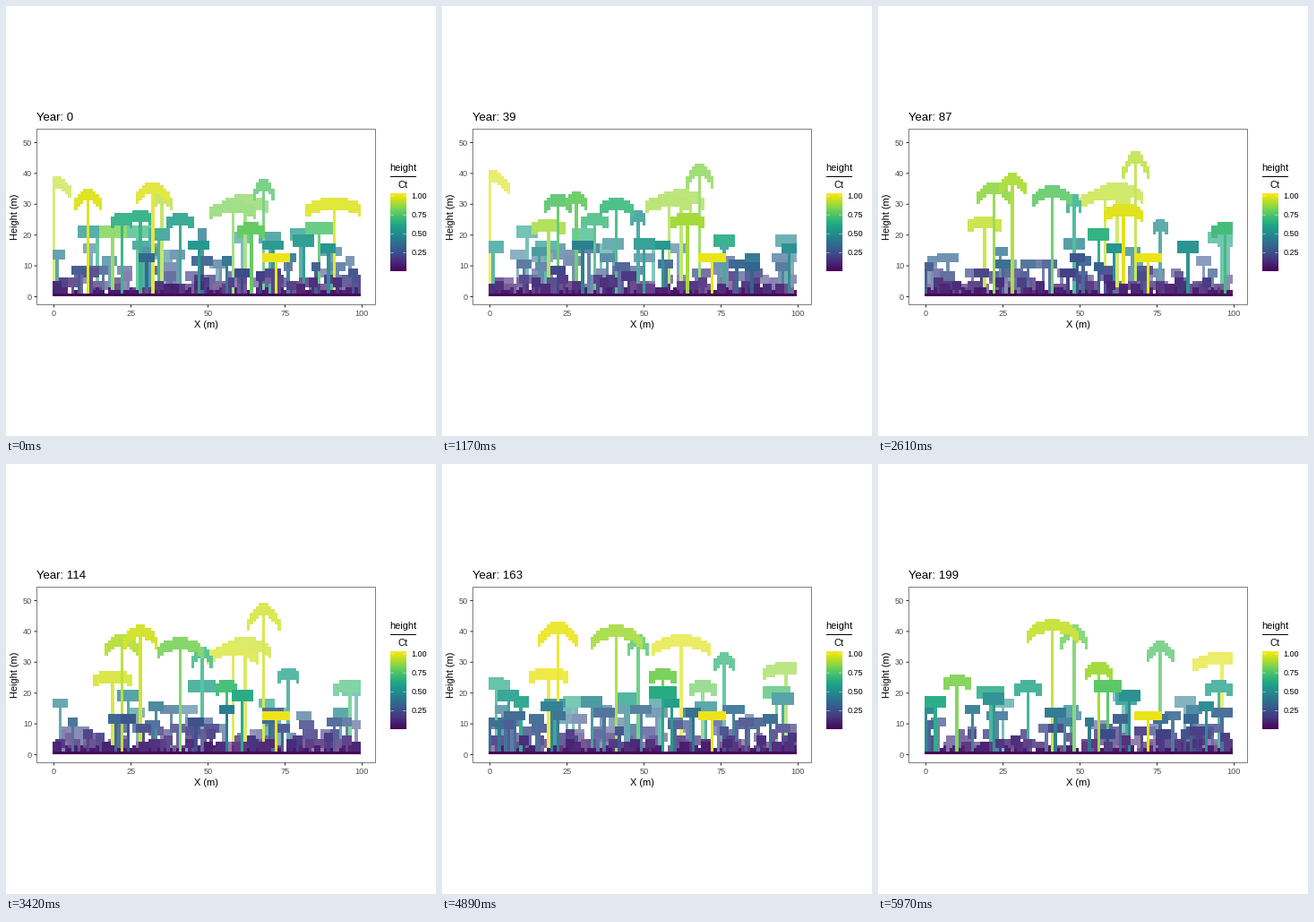
Write a matplotlib script that moves like this. It is 480 px wide and 480 px high and loops after 6 s.

```python
import numpy as np
import matplotlib.pyplot as plt
from matplotlib.animation import FuncAnimation

plt.rcParams["font.family"] = "Liberation Sans"

YEARS, COLS, ROWS = 200, 100, 52
X0, Y0, CELL = 53.5, 324.5, 3.44
PT = 0.75  # points per pixel at 96 dpi
VMAX = 1.03
viridis = plt.colormaps["viridis"]
rng = np.random.default_rng(12)

# Dominant trees, back to front: column, crown radius, first and last height,
# year of death
GIANTS = [
    (0, 6, 39, 42, 70), (96, 9, 6, 34, 205), (62, 9, 33, 40, 190),
    (58, 9, 31, 38, 160), (35, 4, 34, 38, 38), (76, 6, 11, 49, 330),
    (68, 5, 38, 51, 150), (48, 5, 22, 53, 357), (19, 6, 23, 28, 165),
    (32, 5, 37, 38, 14), (91, 9, 32, 33, 10), (41, 9, 27, 47, 247),
    (22, 6, 27, 43, 165), (28, 5, 28, 44, 135), (11, 4, 35, 36, 25),
    (56, 5, 13, 34, 263), (64, 6, 24, 31, 100), (72, 4, 14, 14, 240),
]


def tree(x, alpha, r, ct, born, dies, h0, h1):
    return dict(x=x, alpha=alpha, r=r, ct=ct, born=born, dies=dies,
                h0=h0, h1=h1)


def population(count, life, heights, ct, spread):
    """Seeded random trees, spaced evenly along the transect."""
    for k in range(count):
        x = int((k * 0.618 + rng.uniform(0, .04)) % 1 * COLS)
        age, top = rng.uniform(*life), heights()
        born = rng.uniform(-age, YEARS)
        yield tree(x, rng.uniform(.55, 1), top * spread, rng.uniform(*ct),
                   born, born + age, .35 * top, top)


trees = [tree(x, alpha, r, h1, -1, dies, h0, h1) for (x, r, h0, h1, dies), alpha
         in zip(GIANTS, np.linspace(.62, 1, len(GIANTS)))]
trees += population(75, (60, 120), lambda: rng.uniform(18, 28), (30, 44), .16)
trees += population(700, (18, 66),
                    lambda: min(4 + rng.exponential(4.5), 17), (34, 52), .2)
trees.sort(key=lambda t: t["alpha"])
back = [t for t in trees if t["alpha"] < .85]
front = [t for t in trees if t["alpha"] >= .85]

phase = rng.uniform(0, 2 * np.pi, COLS)
speed = rng.uniform(.1, .4, COLS)


def colour(v, alpha=1.0):
    rgb = np.array(viridis(v / VMAX)[:3])
    return 1 - alpha * (1 - rgb)


def draw_tree(grid, year, t):
    age = (year - t["born"]) / (t["dies"] - t["born"])
    if not 0 <= age < 1:
        return
    height = t["h0"] + (t["h1"] - t["h0"]) * age ** .75
    h = round(height)
    r = round(t["r"] * (height / t["h1"]) ** 1.5)
    depth = max(3, round(.18 * height + .2))
    x, c = t["x"], colour(height / t["ct"], t["alpha"])
    grid[1:max(h - 1, 1), x] = c
    # Low crowns are flat slabs, deep ones droop like an umbrella
    for i in range(max(0, x - r), min(COLS, x + r + 1)):
        drop = round(max(depth - 4, 0) * ((i - x) / (r + .2)) ** 2)
        top = h - drop
        grid[max(top - min(depth, 4), 0):top, i] = c


def draw_turf(grid, year):
    tops = np.rint(2 + .8 * np.sin(phase + speed * year)).astype(int)
    for i, top in enumerate(tops):
        grid[:top, i] = colour(.02 + .025 * top)


def forest(year):
    grid = np.ones((ROWS, COLS, 3))
    for t in back:
        draw_tree(grid, year, t)
    draw_turf(grid, year)
    for t in front:
        draw_tree(grid, year, t)
    grid[0] = colour(.02)
    return grid


fig = plt.figure(figsize=(5, 5), dpi=96, facecolor="white")
ax = fig.add_axes([0, 0, 1, 1])


def line(xs, ys, c="#333333", w=1.07):
    ax.plot(xs, ys, color=c, lw=w * PT, snap=False,
            solid_capstyle="butt", solid_joinstyle="miter")


def label(x, y, s, size, c="black", **kw):
    return ax.text(x, y, s, fontsize=size * PT, color=c, va="baseline", **kw)


image = ax.imshow(np.ones((ROWS, COLS, 3)), origin="lower", aspect="auto",
                  interpolation="nearest",
                  extent=(X0 - CELL / 2, X0 + (COLS - .5) * CELL,
                          Y0, Y0 - ROWS * CELL))

# Panel and axes
left, right, top, bottom = 34.5, 412.5, 137.5, 333.5
line([left, right, right, left, left], [top, top, bottom, bottom, top],
     "#7F7F7F", 1)
for v in range(0, 101, 25):
    px = X0 + v * CELL
    line([px, px], [bottom, bottom + 3])
    label(px, 346, str(v), 9.1, "#4D4D4D", ha="center")
for v in range(0, 51, 10):
    py = Y0 - v * CELL
    line([left - 3, left], [py, py])
    label(29.2, py + 3.2, str(v), 9.1, "#4D4D4D", ha="right")
label(223.5, 359, "X (m)", 11, ha="center")
label(13, 235.3, "Height (m)", 11, ha="center", rotation=90,
      rotation_mode="anchor")
title = label(34.2, 128.2, "Year: 0", 13.2)

# Colour key
label(443.5, 184, "height", 11, ha="center")
line([429, 458], [190.5, 190.5], "black", 1)
label(443.5, 203, "Ct", 11, ha="center")
ax.imshow(viridis(np.linspace(1, 0, 256))[:, None, :3], aspect="auto",
          extent=(429.3, 446.6, 296, 209.4), interpolation="bilinear")
for v in (.25, .5, .75, 1):
    py = 212 + (1 - v) * 84.4
    line([429.3, 432.8], [py, py], "white", .5)
    line([443.1, 446.6], [py, py], "white", .5)
    label(452.3, py + 3.2, f"{v:.2f}", 9)

ax.set_xlim(0, 480)
ax.set_ylim(480, 0)
ax.axis("off")


def update(year):
    image.set_data(forest(year))
    title.set_text(f"Year: {year}")
    return image, title


anim = FuncAnimation(fig, update, frames=YEARS, interval=30,
                     repeat=True, repeat_delay=0)
plt.show()
```
